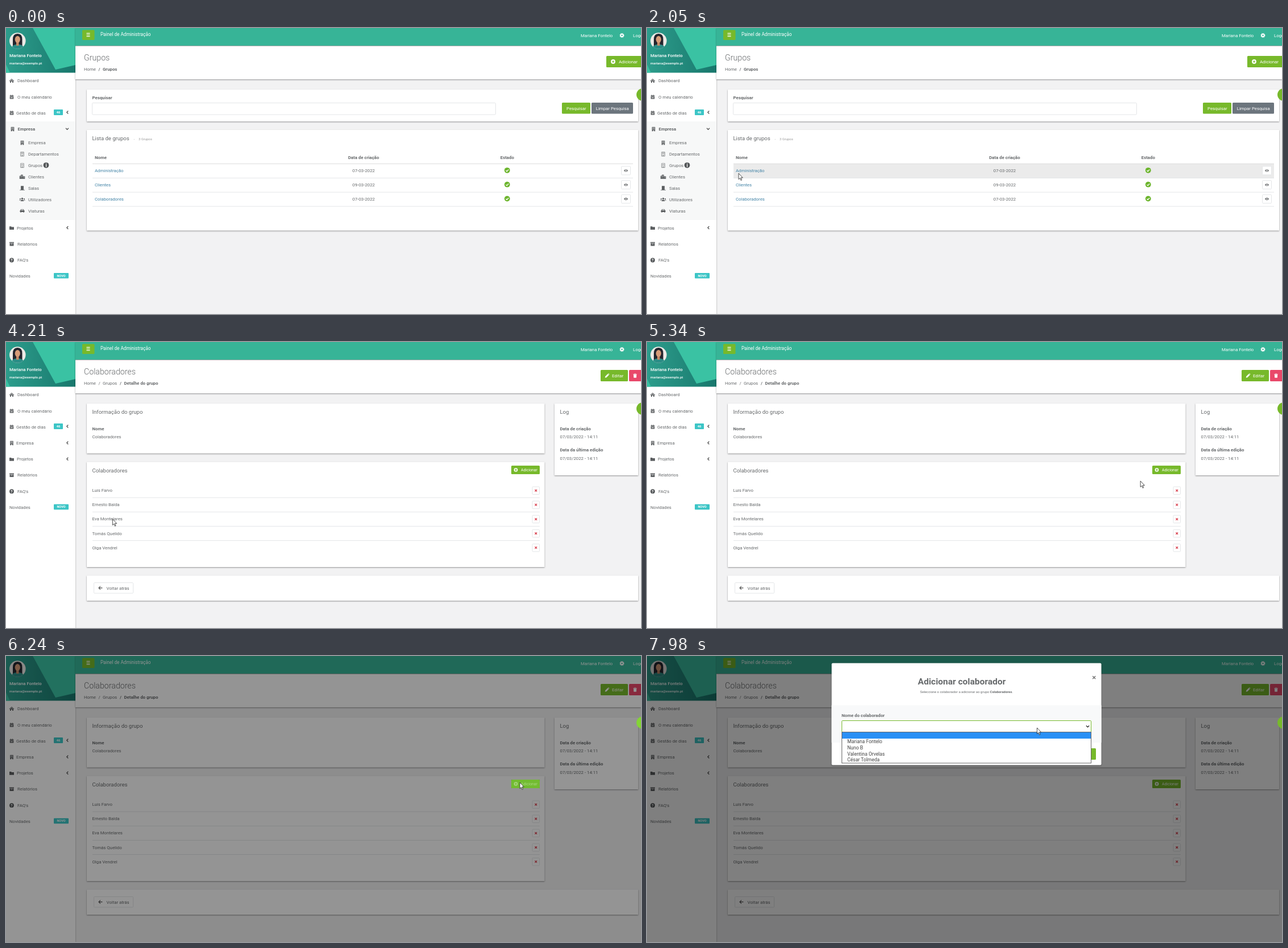
An HTML page that plays this animation: 1116x502 px, repeating every 8000 ms.

```html
<!DOCTYPE html>
<html lang="pt">
<head>
<meta charset="utf-8">
<title>Painel de Administração</title>
<style>
  html, body { margin: 0; width: 100%; height: 100%; overflow: hidden; background: #f2f2f3; }
  svg { display: block; width: 1116px; height: 502px; font-family: Roboto, Arial, sans-serif; }
  .card { filter: drop-shadow(0 1px 1px #0006); }
  text { white-space: pre; }
</style>
</head>
<body>
<svg id="stage" viewBox="0 0 1116 502"></svg>
<script>
const GREEN = '#77b92b', GREY = '#676a6c', LINE = '#e4e6e8', TEAL = '#3cc5c6';

const rect = (x, y, x2, y2, fill, extra = '') =>
  `<rect x="${x}" y="${y}" width="${x2 - x}" height="${y2 - y}" fill="${fill}" ${extra}/>`;
const box = (x, y, x2, y2, stroke = LINE, extra = '') =>
  rect(x + .5, y + .5, x2 - .5, y2 - .5, '#fff', `stroke="${stroke}" rx="1.2" ${extra}`);
const button = (x, y, x2, y2, fill = GREEN, extra = '') => rect(x, y, x2, y2, fill, `rx="1.5" ${extra}`);
const card = (x, y, x2, y2) => rect(x, y, x2, y2, '#fff', 'class="card"');
const circle = (x, y, r, fill, extra = '') => `<circle cx="${x}" cy="${y}" r="${r}" fill="${fill}" ${extra}/>`;
const line = (x, x2, y, color = LINE) => rect(x, y - .5, x2, y + .5, color);
// y is the middle of the capitals
const text = (x, y, str, { size = 7.8, fill = GREY, weight = 400, anchor = 'start', extra = '' } = {}) =>
  `<text x="${x}" y="${y + size * .355}" font-size="${size}" fill="${fill}" font-weight="${weight}" text-anchor="${anchor}" ${extra}>${str}</text>`;
const bold = (x, y, str, options) => text(x, y, str, { weight: 700, ...options });
const white = (x, y, str, options) => text(x, y, str, { fill: '#fff', ...options });
const centered = { anchor: 'middle' };
const stroke = (x, y, d, color = GREY, width = 1.2) =>
  `<path transform="translate(${x} ${y})" d="${d}" fill="none" stroke="${color}" stroke-width="${width}"/>`;
const group = (id, body, extra = '') => `<g id="${id}" ${extra}>${body}</g>`;

const shapes = {
  home: 'M-4.3.3 0-3.5 4.3.3 3.7 1 0-2.3-3.7 1ZM-3 1 0-1.6 3 1V3.5H1V1.3H-1V3.5H-3Z',
  calendar: 'M-3.3-2.8H-2V-3.8H-1V-2.8H1V-3.8H2V-2.8H3.3V-1.2H-3.3ZM-3.3-.7H3.3V3.6H-3.3ZM-1.8.8V1.8H1.8V.8Z',
  building: 'M-2.8-3.8H2.8V3.8H.8V2H-.8V3.8H-2.8ZM-1.6-2.7V-1.6H-.5V-2.7ZM.5-2.7V-1.6H1.6V-2.7ZM-1.6-.7V.4H-.5V-.7ZM.5-.7V.4H1.6V-.7Z',
  outline: 'M-3-3.9H3V3.9H-3ZM-2.3-3.2V3.2H2.3V-3.2ZM-1.4-2.4H-.4V-1.4H-1.4ZM.4-2.4H1.4V-1.4H.4ZM-1.4-.6H-.4V.4H-1.4ZM.4-.6H1.4V.4H.4ZM-.6 1.6H.6V3.4H-.6Z',
  city: 'M-4.8-1.6H-2.4V-3.6H1.2V-1H4.8V3.6H-4.8ZM-3.8-.4V.6H-2.8V-.4ZM-1.2-2.4V-1.4H0V-2.4ZM-1.2-.4V.6H0V-.4ZM2.4.2V1.2H3.6V.2Z',
  door: 'M-2.5-3.8H2.5V2.8H4.4V3.7H-4.4V2.8H-2.5Z',
  users: 'M-1.6-1.6a1.6 1.6 0 1 0 3.2 0a1.6 1.6 0 1 0-3.2 0M-2.8 3V2Q-2.6.4 0 .4T2.8 2V3ZM-4.6-1a1.1 1.1 0 1 0 2.2 0a1.1 1.1 0 1 0-2.2 0M2.4-1a1.1 1.1 0 1 0 2.2 0a1.1 1.1 0 1 0-2.2 0M-5 1.8V1Q-4 0-3 .6L-3.4 1.8ZM5 1.8V1Q4 0 3 .6L3.4 1.8Z',
  car: 'M-4 0Q-4-.8-3.2-1L-2.4-3H2.4L3.2-1Q4-.8 4 0V2H3V3H1.8V2H-1.8V3H-3V2H-4ZM-2.2-1H2.2L1.7-2.1H-1.7Z',
  folder: 'M-4-2.8H-1L0-1.8H4V3H-4Z',
  archive: 'M-4-3.2H4V-1.4H-4ZM-3.5-.9H3.5V3.4H-3.5ZM-1.2-.2V.6H1.2V-.2Z',
  pencil: 'M-3.8 3.8-3.2 1.2 1-3 3-1-1.2 3.2ZM1.5-3.4 2.3-4.1 4.1-2.3 3.4-1.5Z',
  trash: 'M-3.2-3H-1L-.6-3.8H.6L1-3H3.2V-2.2H-3.2ZM-2.7-1.7H2.7L2.3 3.8H-2.3Z',
  eye: 'M-3.6 0Q0-4.6 3.6 0Q0 4.6-3.6 0ZM-1.7 0a1.7 1.7 0 1 0 3.4 0a1.7 1.7 0 1 0-3.4 0M-.9 0a.9.9 0 1 0 1.8 0a.9.9 0 1 0-1.8 0'
};
const icon = (name, x, y, fill = '#5c5f61') =>
  `<path transform="translate(${x} ${y})" d="${shapes[name]}" fill="${fill}" fill-rule="evenodd"/>`;
const plus = (x, y, r = 3.9) => circle(x, y, r, '#fff') + stroke(x, y, 'M-2 0H2M0-2V2', GREEN, 1.2);
const signCircle = (x, y, r, sign) => circle(x, y, r, '#55585a') + white(x, y, sign, { size: r * 1.7, weight: 700, ...centered });
const badge = (x, y, x2, y2, str) => rect(x, y, x2, y2, TEAL, 'rx="1"') +
  white((x + x2) / 2, (y + y2) / 2, str, { size: 5.6, weight: 700, ...centered });
const chevronLeft = y => stroke(108, y, 'M1.3-2.5-1.2 0 1.3 2.5', '#555', 1.3);

function sidebarItem(name, x, y, label, weight = 400, iconX = 10) {
  return icon(name, iconX, y) + text(x, y, label, { weight });
}

function frame() {
  return rect(0, 0, 122, 502, '#fff', 'class="card"') +
    rect(0, 0, 122, 78.5, 'url(#deep)') +
    '<path d="M47 0H122V65L87 73ZM0 64 7 78.5H0Z" fill="#3ac2a3"/>' +
    '<g clip-path="url(#portrait)">' + rect(6, 8, 35, 37, '#eceae6') +
    '<path d="M12 34V20Q12 10 20.300 10T28.500 20V34Z" fill="#23252e"/>' +
    '<path d="M9 37Q10 30 17 29H24Q31 30 32 37Z" fill="#2c8d86"/>' + rect(18, 24, 22.6, 31, '#c48a68') +
    '<ellipse cx="20.300" cy="20" rx="4.600" ry="6" fill="#d79c78"/></g>' +
    white(6, 48.5, 'Mariana Fontelo', { weight: 500 }) +
    white(6, 61.5, 'mariana@exemplo.pt', { size: 6, weight: 500 }) +
    sidebarItem('home', 20, 92.5, 'Dashboard') +
    sidebarItem('calendar', 20, 121, 'O meu calendário') +
    sidebarItem('calendar', 18, 149, 'Gestão de dias') +
    badge(84, 143, 100, 153, '46') + chevronLeft(148) +
    rect(122, 0, 1116, 31, '#37b497', 'class="card"') +
    rect(122, 32, 1116, 90, '#fff', 'class="card"') +
    button(134, 3.5, 155.5, 21) + stroke(144.5, 12, 'M-3-2.600H3M-3 0H3M-3 2.600H3', '#fff', 1.1) +
    white(166, 11.5, 'Painel de Administração', { size: 8.2 }) +
    white(1010, 13, 'Mariana Fontelo') +
    circle(1082.5, 13, 2.2, 'none', 'stroke="#fff" stroke-width="1.800"') +
    circle(1082.5, 13, 3.4, 'none', 'stroke="#fff" stroke-width="1.200" stroke-dasharray="1.600 1.070"') +
    white(1102, 13, 'Logout');
}

const lowerMenu = () => sidebarItem('folder', 19, 351, 'Projetos') + chevronLeft(350.5) +
  sidebarItem('archive', 20, 379, 'Relatórios') +
  signCircle(10, 407.5, 3.9, '?') + text(20, 407.5, "FAQ's") +
  text(6, 435.5, 'Novidades') + badge(84, 430, 110, 439.5, 'NOVO');

function openMenu() {
  const entries = [['building', 'Empresa'], ['outline', 'Departamentos'], ['outline', 'Grupos'], ['city', 'Clientes'],
    ['door', 'Salas'], ['users', 'Utilizadores'], ['car', 'Viaturas']];
  return rect(0, 164, 121.5, 337, '#f7f8f8') + rect(0, 231, 121.5, 251, '#eceeef', 'id="menuHover"') +
    sidebarItem('building', 20.5, 177.5, 'Empresa', 700, 11.5) +
    stroke(107.5, 177, 'M-2.500-1.200 0 1.300 2.500-1.200', '#555', 1.3) +
    entries.map(([name, label], i) => sidebarItem(name, 39, 201.5 + i * 19.9, label, 400, 28.5)).join('') +
    signCircle(70.5, 240.8, 4.9, 'i');
}

const groupRows = [['Administração', '07-03-2022'], ['Clientes', '09-03-2022'], ['Colaboradores', '07-03-2022']];

function listPage() {
  const rows = groupRows.map(([name, date], i) => {
    const y = 250.3 + 24.9 * i;
    return text(156, y, name, { fill: '#4283a6', extra: 'class="link"' }) + text(628.5, y, date, centered) +
      circle(880.8, y - .5, 4.9, '#6db52e') + stroke(880.8, y - .3, 'M-2.300 0-.600 1.700 2.500-1.600', '#fff', 1.3) +
      box(1081, y - 8, 1098, y + 8) + icon('eye', 1089.5, y) + line(152, 1102, 263.3 + 24.9 * i);
  }).join('');
  return openMenu() + lowerMenu() +
    text(137, 51.5, 'Grupos', { size: 14.2, weight: 300 }) +
    text(137, 72, 'Home') + bold(162.5, 72, '/') + bold(170, 72, 'Grupos') +
    button(1055, 49, 1120, 69) + plus(1067, 59) + white(1077, 59, 'Adicionar') +
    card(142, 108, 1111, 164) + bold(151.5, 122.5, 'Pesquisar') + box(151, 131, 861, 152.5) +
    button(977, 131, 1027, 150.5) + white(1002.3, 141, 'Pesquisar', centered) +
    button(1029, 131, 1102, 150.5, '#6c757d') + white(1065.8, 141, 'Limpar Pesquisa', centered) +
    card(142, 179, 1111, 355.5) + text(151.5, 194, 'Lista de grupos', { size: 9.5 }) +
    text(224.5, 194.5, '-', { size: 6, fill: '#999' }) + text(233, 195, '3 Grupos', { size: 5.9, fill: '#999' }) +
    bold(156, 227, 'Nome') + bold(628.5, 227, 'Data de criação', centered) + bold(880.8, 227, 'Estado', centered) +
    rect(152, 238, 1102, 263.3, '#ebebeb', 'id="rowHover"') + line(152, 1102, 238.3, '#dcdcdc') + rows;
}

const members = ['Luís Farvo', 'Ernesto Balda', 'Eva Montelares', 'Tomás Quelido', 'Olga Vendrel'];
const smallAdd = () => plus(896, 224.5, 3.3) + white(905, 224.5, 'Adicionar', { size: 6.8 });

function detailPage() {
  const people = members.map((name, i) => {
    const y = 260.5 + 25.1 * i;
    return text(151.5, y, name) + box(924.5, y - 7, 938, y + 7.5) +
      stroke(931.3, y + .2, 'M-1.800-1.800 1.800 1.800M1.800-1.800-1.800 1.800', '#d8414f', 1.3) +
      (i < 4 ? line(152, 938, y + 12.7) : '');
  }).join('');
  const cards = card(142, 108, 946.5, 195.5) + text(151.5, 122.5, 'Informação do grupo', { size: 9.5 }) +
    bold(151.5, 152, 'Nome') + text(151.5, 166, 'Colaboradores') +
    card(964, 108, 1111, 234) + text(973.5, 122.5, 'Log', { size: 9.5 }) +
    bold(973.5, 152, 'Data de criação') + text(973.5, 166, '07/03/2022 - 14:11') +
    bold(973.5, 189.5, 'Data da última edição') + text(973.5, 204, '07/03/2022 - 14:11') +
    card(142, 210.5, 946.5, 395) + text(151.5, 225.5, 'Colaboradores', { size: 9.5 }) +
    button(888, 217, 938, 232, GREEN, 'id="addButton"') + smallAdd() + people +
    card(142, 410, 1111, 454) + box(154, 422, 224, 441.5) +
    stroke(166, 431.7, 'M3.400 0H-2.800M0-3-3 0 0 3', '#555', 1.2) + text(176.5, 432, 'Voltar atrás');
  return sidebarItem('building', 18, 177.5, 'Empresa') + chevronLeft(177) +
    `<g transform="translate(0 -145.300)">${lowerMenu()}</g>` +
    text(137, 51.5, 'Colaboradores', { size: 14.2, weight: 300 }) +
    text(137, 72, 'Home') + text(162.5, 72, '/') + text(170, 72, 'Grupos') + bold(200, 72, '/') + bold(207.5, 72, 'Detalhe do grupo') +
    button(1045, 49, 1093, 69) + icon('pencil', 1056.5, 59, '#fff') + white(1065, 59.3, 'Editar') +
    button(1095, 49, 1120, 69, '#e9486a') + icon('trash', 1105.5, 59, '#fff') + group('cards', cards);
}

function modal() {
  const options = ['Mariana Fontelo', 'Nuno B', 'Valentina Orvelas', 'César Tolmeda'];
  const list = rect(342.5, 133.5, 780.5, 188, '#fff', 'stroke="#666"') + rect(343, 134, 780, 145, '#2a90f5') +
    options.map((name, i) => text(352, 150.2 + 10.7 * i, name, { size: 8.5, fill: '#444' })).join('');
  return rect(324.5, 12.5, 798.5, 191.5, '#fff', 'rx="2" class="card"') +
    rect(324.5, 86.5, 798.5, 152, '#f8f9fa') +
    bold(476, 44.5, 'Adicionar colaborador', { size: 15.5 }) +
    text(561.5, 63, 'Seleccione o colaborador a adicionar ao grupo <tspan font-weight="700">Colaboradores</tspan>.', { size: 5.9, ...centered }) +
    stroke(785.7, 37.8, 'M-2.500-2.500 2.500 2.500M2.500-2.500-2.500 2.500', '#777', 1.6) +
    bold(342, 104.5, 'Nome do colaborador') + box(342, 113, 781, 134, '#d0d3d6', 'id="field"') +
    stroke(774.5, 123.5, 'M-2.600-1.300 0 1.300 2.600-1.300', '#333', 1.4) +
    box(692, 162, 731, 181.5) + text(711.5, 171.5, 'Fechar', centered) +
    button(735.5, 162, 789, 182) + stroke(747, 171.7, 'M-3.500 0-1 2.500 3.700-2.500', '#fff', 1.8) + white(758.5, 171.7, 'Gravar') +
    group('options', list);
}

const stage = document.getElementById('stage');
stage.innerHTML = `<defs>
    <linearGradient id="deep"><stop stop-color="#2d9d8c"/><stop offset="1" stop-color="#18776c"/></linearGradient>
    <clipPath id="portrait"><circle cx="20.300" cy="22.500" r="14.300"/></clipPath>
  </defs>` + rect(0, 0, 1116, 502, '#f2f2f3') + frame() + group('list', listPage()) + group('detail', detailPage()) +
  rect(0, 0, 1116, 502, '#000', 'id="dim"') +
  group('pressed', button(888, 217, 938, 232, 'currentColor') + `<g opacity=".4">${smallAdd()}</g>`) +
  circle(1119, 117, 11, GREEN, 'id="fab"') + group('dialog', modal()) +
  '<path id="pointer" stroke="#222" stroke-width=".8" fill="#fff" stroke-linejoin="round"/>';

const ui = Object.fromEntries([...stage.querySelectorAll('[id]')].map(el => [el.id, el]));
const links = [...stage.querySelectorAll('.link')];
const ARROW = 'M0 0V10.600L2.400 8.400 4 12.400 5.600 11.700 4 7.800H7.300Z';
const HAND = 'M-1.200 1Q0-.800 1.200 1V5.200L5.200 6.200Q6.600 7 6.400 8.500L5.200 13V15H-1V13L-3.800 9Q-3.800 7.400-2.600 7.700L-1.200 9Z';

// time, x, y
const path = [[310, 420, 386], [990, 64, 249], [1730, 64, 249], [2050, 161, 255], [2580, 170, 284], [3070, 172, 302],
  [4150, 172, 302], [4400, 235, 338], [4680, 462, 300], [4840, 390, 255], [5000, 264, 242], [5340, 867, 244],
  [5560, 908, 226], [5750, 903, 222], [6530, 903, 222], [6770, 786, 173], [7040, 741, 105], [7120, 741, 105],
  [7200, 739, 119], [7780, 739, 119], [7980, 685.5, 126]];

const clamp = v => Math.min(1, Math.max(0, v));
const show = (el, on) => el.setAttribute('display', on ? 'inline' : 'none');

function pointerAt(t) {
  const next = path.findIndex(p => p[0] > t);
  if (next < 0) return path.at(-1).slice(1);
  if (next === 0) return path[0].slice(1);
  const [a, b] = [path[next - 1], path[next]];
  const k = (t - a[0]) / (b[0] - a[0]);
  return [a[1] + (b[1] - a[1]) * k, a[2] + (b[2] - a[2]) * k];
}

function draw(t) {
  const [x, y] = pointerAt(t);
  const onList = t < 3750, visible = t >= 310;
  show(ui.list, onList);
  show(ui.detail, !onList);
  show(ui.cards, t >= 4010);

  const row = Math.floor((y - 238.3) / 24.9);
  const onRow = visible && onList && x > 152 && row >= 0 && row < 3;
  show(ui.rowHover, onRow);
  ui.rowHover.setAttribute('y', 238.3 + 24.9 * row);
  const linkY = 250.3 + 24.9 * row;
  const onLink = i => onRow && row === i && x > 156 && x < 156 + [51, 28, 51][i] && Math.abs(y - linkY) < 4.5;
  links.forEach((link, i) => link.setAttribute('fill', onLink(i) ? '#2c4f8c' : '#4283a6'));
  const onMenu = visible && onList && x < 122;
  show(ui.menuHover, onMenu);
  ui.menuHover.setAttribute('y', 231 + 20 * Math.floor((y - 231) / 20));

  const onAdd = !onList && x > 888 && x < 938 && y > 217 && y < 232;
  const pressed = t >= 6020 && t < 6560;
  ui.addButton.setAttribute('fill', onAdd ? '#6aa726' : GREEN);
  show(ui.pressed, pressed);
  const dim = clamp((t - 6115) / 150);
  const lime = `rgb(${138 - 28 * dim},${232 - 52 * dim},${64 - 18 * dim})`;
  ui.pressed.setAttribute('color', lime);
  ui.fab.setAttribute('fill', pressed ? '#84d436' : GREEN);
  ui.dim.setAttribute('opacity', dim / 2);

  show(ui.dialog, t >= 6265);
  ui.dialog.setAttribute('opacity', clamp((t - 6265) / 150));
  ui.dialog.setAttribute('transform', `translate(0 ${-30 * (1 - clamp((t - 6265) / 300)) ** 1.65})`);
  ui.field.setAttribute('stroke', t >= 7180 ? GREEN : '#d0d3d6');
  show(ui.options, t >= 7300);

  const hand = onMenu && t < 1190 || t < 3610 && [0, 1, 2].some(onLink) || onAdd && t < 6020;
  show(ui.pointer, visible);
  ui.pointer.setAttribute('d', hand ? HAND : ARROW);
  ui.pointer.setAttribute('transform', `translate(${x} ${y})`);
}

function tick() {
  draw(performance.now() % 8000);
  requestAnimationFrame(tick);
}
tick();
</script>
</body>
</html>
```
